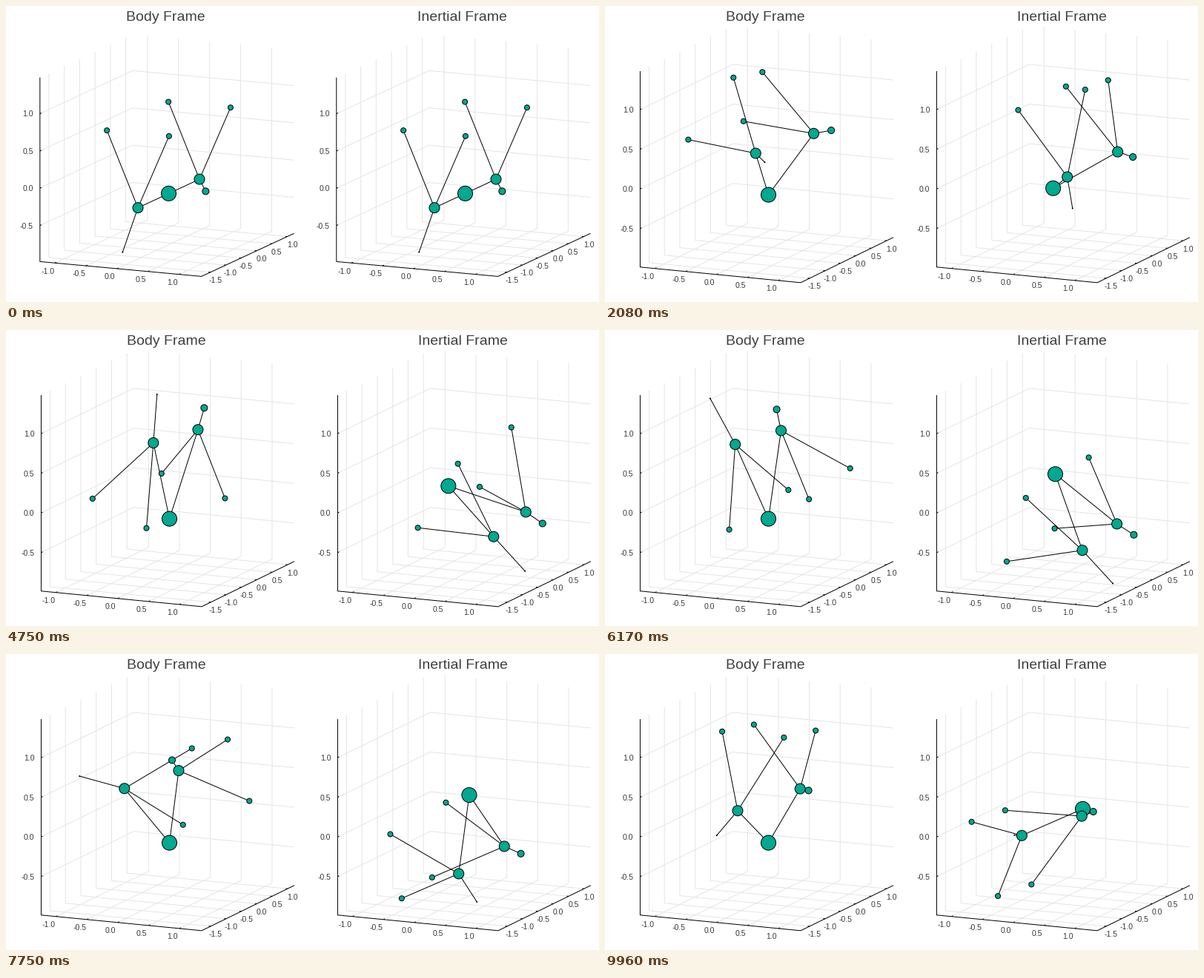
Write a matplotlib script that moves like this. It is 800x400 px and loops after 10 s.

```python
import numpy as np
import matplotlib.pyplot as plt
from matplotlib.animation import FuncAnimation
from matplotlib.collections import LineCollection

W, H = 800, 400
FRAMES, LOOP_MS = 240, 10000
SUBSTEPS = 4
PX = 0.72  # points per pixel at 100 dpi
TEAL = "#00a98f"
BEND, BEND_END = np.radians(30), 0.05

XLIM, YLIM, ZLIM = (-1.24, 1.36), (-1.79, 1.22), (-0.985, 1.485)
XTICKS = np.arange(-1, 1.01, 0.5)
YTICKS = np.arange(-1.5, 1.01, 0.5)
ZTICKS = np.arange(-0.5, 1.01, 0.5)

# The body: spine centre, rear half (hip, two legs, tail), front half (shoulder, two legs, head)
POINTS = np.array([
    (0, 0, 0),
    (0, -1, 0), (-0.5, -1, 1), (0.5, -1, 1), (0, -1.5, -0.5),
    (0, 1, 0), (-0.5, 1, 1), (0.5, 1, 1), (0, 1.2, -0.2),
])
MASS = np.array([20, 14, 7, 7, 1, 14, 7, 7, 9])
BONES = [(0, 1), (0, 5), (1, 2), (1, 3), (1, 4), (5, 6), (5, 7), (5, 8)]
DRAW_ORDER = [0, 1, 5, 2, 3, 4, 6, 7, 8]
REST = POINTS - MASS @ POINTS / MASS.sum()
REAR, FRONT = slice(1, 5), slice(5, 9)


class View:
    """Affine projection of the plot box to pixels."""

    def __init__(self, origin, ux, uy, uz, title_x):
        self.origin = np.array(origin)
        self.basis = np.array([ux, uy, (0, -uz)])
        self.title_x = title_x

    def __call__(self, pts, shift=0):
        return np.asarray(pts, float) @ self.basis + self.origin + (shift, 0)


FIRST_VIEW = View((223.5, 220.7), (83.8, 7.7), (41.5, -19.3), 100.7, 214.5)
MAIN_VIEW = View((224.5, 220.4), (83.3, 8.1), (41.5, -20.3), 107.2, 215.5)


def rot_x(a):
    c, s = np.cos(a), np.sin(a)
    return np.array([(1, 0, 0), (0, c, -s), (0, s, c)])


def rot_y(a):
    c, s = np.cos(a), np.sin(a)
    return np.array([(c, 0, s), (0, 1, 0), (-s, 0, c)])


def rot_vec(w):
    angle = np.linalg.norm(w)
    if angle < 1e-12:
        return np.eye(3)
    x, y, z = w / angle
    k = np.array([(0, -z, y), (z, 0, -x), (-y, x, 0)])
    return np.eye(3) + np.sin(angle) * k + (1 - np.cos(angle)) * k @ k


def shape(u):
    """Body-frame pose at loop position u: bend first, then spin both halves."""
    bend = BEND * min(u / BEND_END, 1)
    spin = rot_y(-2 * np.pi * max(u - BEND_END, 0) / (1 - BEND_END))
    pts = REST.copy()
    pts[REAR] = REST[REAR] @ (rot_x(-bend) @ spin).T
    pts[FRONT] = REST[FRONT] @ (rot_x(bend) @ spin).T
    return pts


def reaction(p0, p1):
    """Small rotation that keeps the angular momentum at zero."""
    centre = lambda p: p - MASS @ p / MASS.sum()
    r = centre((p0 + p1) / 2)
    momentum = MASS @ np.cross(r, centre(p1 - p0))
    inertia = (MASS @ (r * r).sum(1)) * np.eye(3) - (r.T * MASS) @ r
    return -np.linalg.solve(inertia, momentum)


def simulate():
    n = (FRAMES - 1) * SUBSTEPS
    poses = [shape(k / n) for k in range(n + 1)]
    turn = np.eye(3)
    turned = [poses[0]]
    for p0, p1 in zip(poses, poses[1:]):
        turn = turn @ rot_vec(reaction(p0, p1))
        turned.append(p1 @ turn.T)
    return poses[::SUBSTEPS], turned[::SUBSTEPS]


fig = plt.figure(figsize=(W / 100, H / 100), dpi=100, facecolor="white")
ax = fig.add_axes([0, 0, 1, 1])
ax.set_xlim(-0.5, W - 0.5)
ax.set_ylim(H - 0.5, -0.5)
ax.axis("off")


def label(x, y, text, size, ha="center", color="#3a3a3a"):
    return ax.text(x, y, text, fontsize=size * PX, family="Liberation Sans",
                   color=color, ha=ha, va="baseline")


def segments(lines, view, shift, color, zorder):
    coll = LineCollection([view(line, shift) for line in lines], colors=color,
                          linewidths=PX, zorder=zorder)
    return ax.add_collection(coll, autolim=False)


def build_box(view, shift, title):
    (x0, x1), (y0, y1), (z0, z1) = XLIM, YLIM, ZLIM
    grid, axes, items = [], [], []
    for x in XTICKS:
        grid.append([(x, y0, z0), (x, y1, z0), (x, y1, z1)])
        axes.append([(x, y0, z0), (x, y0 + 0.05, z0)])
        px, py = view((x, y0, z0), shift)
        items.append(label(px - 9.5, py + 14.3, f"{x:.1f}", 10.5))
    for y in YTICKS:
        grid.append([(x1, y, z0), (x0, y, z0), (x0, y, z1)])
        axes.append([(x1, y, z0), (x1 - 0.03, y, z0)])
        px, py = view((x1, y, z0), shift)
        items.append(label(px + 6.5, py + 14.3, f"{y:.1f}", 10.5))
    for z in ZTICKS:
        grid.append([(x0, y0, z), (x0, y1, z), (x1, y1, z)])
        axes.append([(x0, y0, z), (x0, y0 + 0.05, z)])
        px, py = view((x0, y0, z), shift)
        items.append(label(px - 9, py + 4, f"{z:.1f}", 10.5, "right"))
    axes.append([(x0, y0, z1), (x0, y0, z0), (x1, y0, z0), (x1, y1, z0)])
    items.append(segments(grid, view, shift, "#e5e5e5", 1))
    items.append(segments(axes, view, shift, "black", 2))
    items.append(label(view.title_x + shift, 19, title, 19.5, color="#404040"))
    return items


class Panel:
    def __init__(self, title, shift, poses):
        self.shift, self.poses = shift, poses
        self.boxes = {v: build_box(v, shift, title) for v in (FIRST_VIEW, MAIN_VIEW)}
        self.bones = segments([POINTS[list(b)] for b in BONES], MAIN_VIEW, shift, "black", 3)
        sizes = (MASS[DRAW_ORDER] * PX) ** 2
        self.nodes = ax.scatter(*np.zeros((2, len(MASS))), s=sizes, c=TEAL,
                                edgecolors="black", linewidths=PX, zorder=4)

    def draw(self, i):
        view = FIRST_VIEW if i == 0 else MAIN_VIEW
        for v, items in self.boxes.items():
            for item in items:
                item.set_visible(v is view)
        pts = view(self.poses[i], self.shift)
        self.bones.set_segments([pts[list(b)] for b in BONES])
        self.nodes.set_offsets(pts[DRAW_ORDER])


body_poses, inertial_poses = simulate()
panels = [Panel("Body Frame", 0, body_poses),
          Panel("Inertial Frame", 400, inertial_poses)]


def update(i):
    for panel in panels:
        panel.draw(i)
    return []


anim = FuncAnimation(fig, update, frames=FRAMES, interval=LOOP_MS / FRAMES,
                     repeat=True, repeat_delay=0, blit=False)
plt.show()
```
